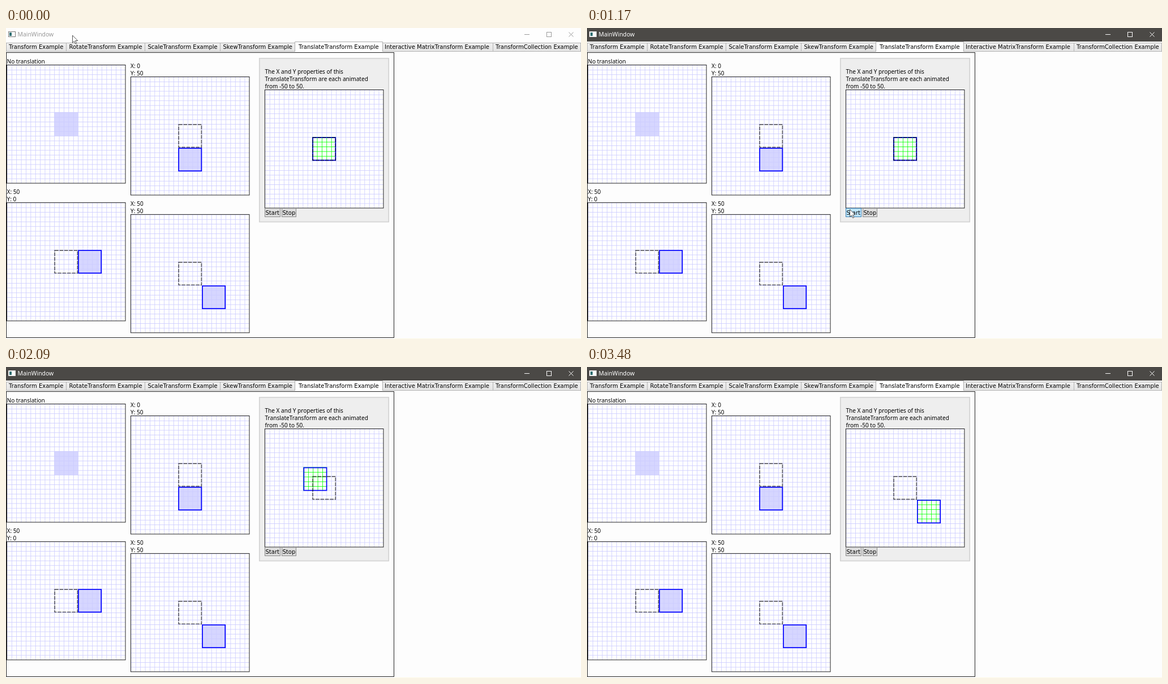
An HTML page with a canvas for the animation above (5.46 s loop, 1016 px wide and 551 px high).

```html
<!DOCTYPE html>
<html lang="en">
<head>
<meta charset="utf-8">
<title>MainWindow</title>
<style>
html, body { margin: 0; width: 100%; height: 100%; overflow: hidden; background: #fdfdfd; }
canvas { display: block; }
</style>
</head>
<body>
<canvas id="stage" width="1016" height="551"></canvas>
<script>
const ctx = document.getElementById('stage').getContext('2d');
const LOOP = 5460;
const UNIT = 0.838;          // one drawing unit in pixels
const CELL = 10 * UNIT;
const SIDE = 50 * UNIT;
const BOX = 250 * UNIT;
const UI = '10px "DejaVu Sans", sans-serif';
const LABEL = '10.05px "Noto Sans", sans-serif';
const MOVE_START = 1465, MOVE_TIME = 2000;

// Times at which the screen refreshes, with the pointer while it is on stage.
const STEPS = [
  [0, 117.5, 13], [90, 485, 275], [230, 564, 345], [390, 564.5, 376.5], [550, 564.5, 376.5],
  [710, 500, 318], [870, 468, 319], [1010, 465, 319], [1170, 464.5, 321.5], [1330, 464.5, 324],
  [1470, 466, 324], [1630, 566, 345], [1770, 669, 363],
  [1930], [2090], [2230], [2390], [2560], [2700], [2870], [3040], [3180], [3340], [3480]
];

const TABS = [
  ['Transform Example', 0, 5], ['RotateTransform Example', 106, 111.5],
  ['ScaleTransform Example', 245, 250.5], ['SkewTransform Example', 378, 383.5],
  ['TranslateTransform Example', 511, 517], ['Interactive MatrixTransform Example', 665, 669],
  ['TransformCollection Example', 860, 865]
];
const SELECTED = 4;

function fill(x, y, w, h, color) {
  ctx.fillStyle = color;
  ctx.fillRect(x, y, w, h);
}

function frame(x, y, w, h, color, width = 1) {
  ctx.strokeStyle = color;
  ctx.lineWidth = width;
  ctx.strokeRect(x, y, w, h);
}

function line(color, ...pts) {
  ctx.strokeStyle = color;
  ctx.lineWidth = 1;
  ctx.beginPath();
  for (let i = 0; i < pts.length; i += 4) {
    ctx.moveTo(pts[i], pts[i + 1]);
    ctx.lineTo(pts[i + 2], pts[i + 3]);
  }
  ctx.stroke();
}

function text(str, x, y, font = LABEL, color = '#000') {
  ctx.font = font;
  ctx.fillStyle = color;
  ctx.fillText(str, x, y);
}

function grid(x, y, count, color) {
  const size = count * CELL;
  fill(x, y, size, size, '#fff');
  for (let i = 0; i < count; i++) {
    fill(x + i * CELL, y, UNIT, size, color);
    fill(x, y + i * CELL, size, UNIT, color);
  }
}

function gridBox(x, y) {
  grid(x, y, 25, '#ccccff');
  frame(x, y, BOX, BOX, '#222');
}

// Outline lying inside the bounds of a 50-unit square.
function outline(x, y, color) {
  frame(x + UNIT, y + UNIT, SIDE - 2 * UNIT, SIDE - 2 * UNIT, color, 2 * UNIT);
}

function dashed(x, y) {
  ctx.setLineDash([8 * UNIT, 2 * UNIT]);
  outline(x, y, 'rgba(0,0,0,0.6)');
  ctx.setLineDash([]);
}

function sample(x, y, dx, dy) {
  gridBox(x, y);
  const sx = x + 2 * SIDE, sy = y + 2 * SIDE;
  const moved = dx || dy;
  if (moved) dashed(sx, sy);
  fill(sx + dx * UNIT, sy + dy * UNIT, SIDE, SIDE, 'rgba(204,204,255,0.8)');
  if (moved) outline(sx + dx * UNIT, sy + dy * UNIT, '#0000ff');
}

function titleBar(active) {
  const ink = active ? '#fff' : '#999';
  fill(0, 0, 1016, 24, active ? '#4b4946' : '#fefefe');
  fill(4, 6, 13, 10, active ? '#e8e8e8' : '#777');
  fill(5, 7, 11, 8, '#fff');
  fill(6, 8, 4, 6, '#2f6f73');
  text('MainWindow', 20.5, 15, '10.4px "Noto Sans", sans-serif', ink);
  line(ink, 916, 11.5, 925, 11.5, 994.5, 7.5, 1002.5, 15.5, 1002.5, 7.5, 994.5, 15.5);
  frame(955.5, 7.5, 8, 8, ink);
}

function tab(i) {
  const [label, x, tx] = TABS[i];
  const end = i + 1 < TABS.length ? TABS[i + 1][1] : 1015;
  if (i === SELECTED) {
    fill(x - 1, 24, end - x + 2, 19, '#fff');
    line('#acacac', x - 0.5, 42, x - 0.5, 24.5, x - 0.5, 24.5, end + 0.5, 24.5, end + 0.5, 24.5, end + 0.5, 42);
  } else {
    const shade = ctx.createLinearGradient(0, 26, 0, 41);
    shade.addColorStop(0, '#f0f0f0');
    shade.addColorStop(1, '#e5e5e5');
    fill(x, 26, end - x, 15, shade);
    frame(x + 0.5, 26.5, end - x, 15, '#b4b4b4');
  }
  text(label, tx, 37, UI);
}

function button(label, x, w, tx, state) {
  const [back, edge] = {
    idle: ['#dddddd', '#8a8a8a'],
    hover: ['#bee6fd', '#3c7fb1'],
    down: ['#c4e5f6', '#2c628b']
  }[state];
  fill(x, 320, w, 15, back);
  frame(x + 0.5, 319.5, w - 1, 15, edge);
  text(label, tx, 331, UI);
}

function animatedBox(x, y, shift) {
  gridBox(x, y);
  const sx = x + 2 * SIDE, sy = y + 2 * SIDE;
  const d = shift * UNIT;
  grid(sx + d, sy + d, 5, '#00ff00');
  outline(sx + d, sy + d, '#0000ff');
  dashed(sx, sy);
}

function pointer(x, y) {
  const shape = [[0, 0], [0, 13], [3, 10.3], [5.2, 15], [7.2, 14.1], [5.1, 9.5], [9.3, 9.5]];
  ctx.beginPath();
  for (const [px, py] of shape) ctx.lineTo(x + px, y + py);
  ctx.closePath();
  ctx.fillStyle = '#fff';
  ctx.fill();
  ctx.strokeStyle = '#333';
  ctx.lineWidth = 0.85;
  ctx.stroke();
}

function draw(time) {
  const [t, px, py] = STEPS.findLast(s => s[0] <= time);
  fill(0, 0, 1016, 551, '#fdfdfd');
  titleBar(t >= 550);
  line('#b4b4b4', 0, 41.5, 1016, 41.5);
  TABS.forEach((_, i) => { if (i !== SELECTED) tab(i); });
  tab(SELECTED);

  fill(686, 550, 330, 1, '#fdf9e6');
  frame(0.5, 43.5, 685, 505, '#222');

  text('No translation', 1.5, 62.5);
  sample(1.5, 65.5, 0, 0);
  text('X: 0', 220, 71);
  text('Y: 50', 220, 83.5);
  sample(220.5, 86.5, 0, 50);
  text('X: 50', 1.5, 293.5);
  text('Y: 0', 1.5, 306.5);
  sample(1.5, 309.4, 50, 0);
  text('X: 50', 220, 315);
  text('Y: 50', 220, 327.5);
  sample(220.5, 330.4, 50, 50);

  fill(447, 53, 230, 291, '#eeeeee');
  frame(447.8, 53.8, 228.4, 289.7, '#d3d3d3', 1.7);
  text('The X and Y properties of this', 457.5, 81);
  text('TranslateTransform are each animated', 457.5, 93.5);
  text('from -50 to 50.', 457.5, 106.5);
  const progress = Math.min(1, (t - MOVE_START) / MOVE_TIME);
  animatedBox(457.4, 109.5, progress < 0 ? 0 : -50 + 100 * progress);

  const over = t >= 870 && t < 1630;
  button('Start', 457, 28, 458.5, t === 1330 ? 'down' : over ? 'hover' : 'idle');
  button('Stop', 487, 26, 488.5, 'idle');

  if (px !== undefined) pointer(px, py);
}

const begin = performance.now();
function tick() {
  draw((performance.now() - begin) % LOOP);
  requestAnimationFrame(tick);
}
tick();
</script>
</body>
</html>
```
